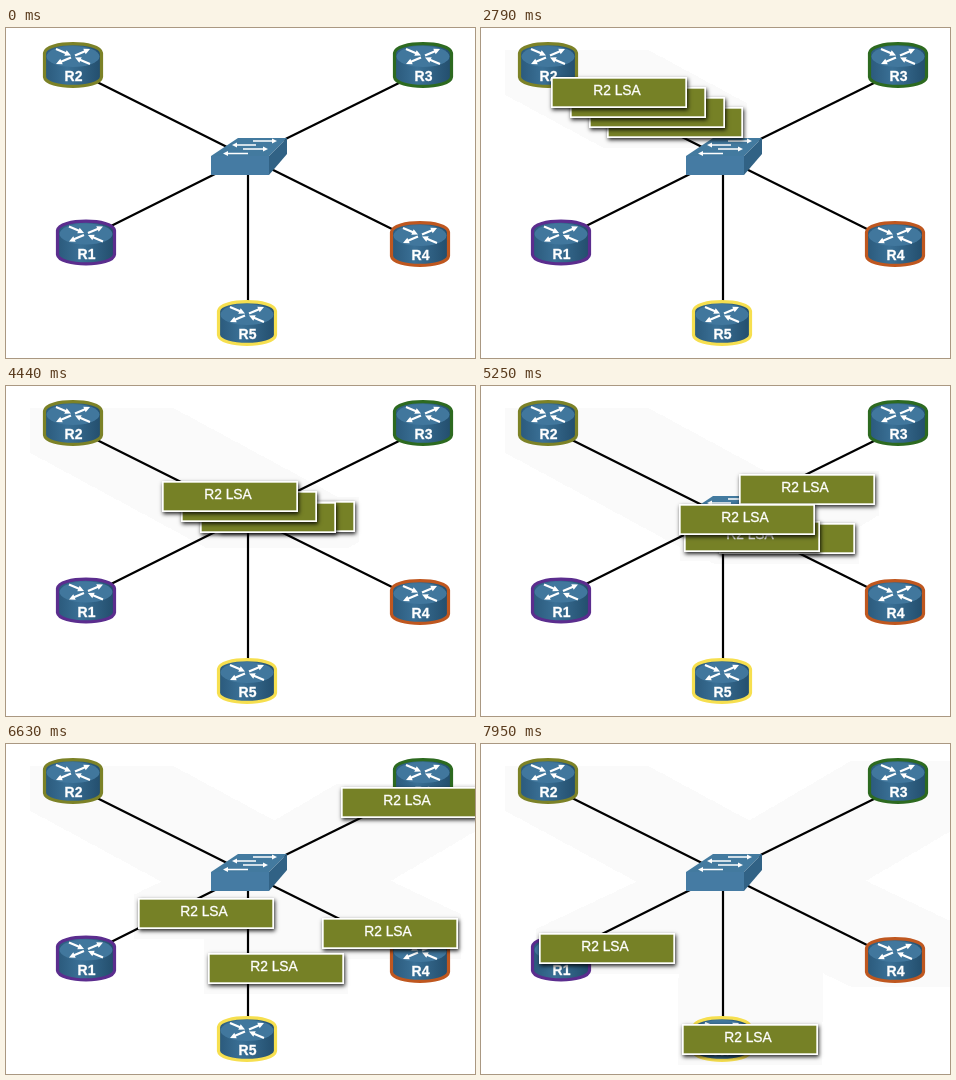
These frames come from a looping animation (469x330 px, 8 s). An HTML page with a canvas:

```html
<!DOCTYPE html>
<html lang="en">
<head>
<meta charset="utf-8">
<title>Link-state flooding</title>
<style>
  html, body { margin: 0; width: 100%; height: 100%; overflow: hidden; background: #fff; }
  canvas { display: block; }
</style>
</head>
<body>
<canvas id="stage" width="469" height="330"></canvas>
<script>
const ctx = document.getElementById('stage').getContext('2d');
const FONT = '"Liberation Sans", Arial, sans-serif';
const LOOP = 8000;

// Cards leave R2 one after another, meet at the switch and fan out.
const FIRST = 900, STAGGER = 360, TO_SWITCH = 3365, TO_ROUTER = 3060, HOLD = 120;
const CARD = { w: 136, h: 31 };
const START = { x: 28, y: 26 };
const TURN = { x: 203.2, y: 120.7 };
const ENDS = [
  { x: 374, y: 20.5 },   // R3
  { x: 375, y: 202.5 },  // R4
  { x: 200.8, y: 285.5 },// R5
  { x: 33, y: 201 }      // R1
];

const HUB = { x: 242, y: 129.6 };
const ROUTERS = [
  { name: 'R2', x: 67, y: 37, color: '#7c8227', link: [90, 53.5] },
  { name: 'R3', x: 417, y: 37, color: '#2d6a20', link: [395, 54] },
  { name: 'R1', x: 80, y: 214.5, color: '#5b2d8e', link: [104, 198.5] },
  { name: 'R4', x: 414, y: 216, color: '#bf571f', link: [388, 202] },
  { name: 'R5', x: 241, y: 295, color: '#f6df4f', link: [242, 275] }
];

const mix = (a, b, k) => ({ x: a.x + (b.x - a.x) * k, y: a.y + (b.y - a.y) * k });

function cardPosition(end, age) {
  if (age < TO_SWITCH) return mix(START, TURN, age / TO_SWITCH);
  return mix(TURN, end, Math.min(1, (age - TO_SWITCH) / TO_ROUTER));
}

function polygon(points, fill) {
  ctx.beginPath();
  points.forEach(([x, y]) => ctx.lineTo(x, y));
  ctx.closePath();
  ctx.fillStyle = fill;
  ctx.fill();
}

function label(text, x, y, font) {
  ctx.font = `${font} ${FONT}`;
  ctx.textAlign = 'center';
  ctx.fillStyle = ctx.strokeStyle = '#fff';
  ctx.lineWidth = 0.3;
  ctx.fillText(text, x, y);
  ctx.strokeText(text, x, y);
}

function arrow(x1, y1, x2, y2, width, head) {
  const length = Math.hypot(x2 - x1, y2 - y1);
  ctx.save();
  ctx.translate(x1, y1);
  ctx.rotate(Math.atan2(y2 - y1, x2 - x1));
  const w = width / 2, neck = length - head;
  polygon([[0, -w], [neck, -w], [neck, -head / 2], [length, 0],
           [neck, head / 2], [neck, w], [0, w]], '#fff');
  ctx.restore();
}

function drawLink({ link }) {
  ctx.beginPath();
  ctx.moveTo(...link);
  ctx.lineTo(HUB.x, HUB.y);
  ctx.strokeStyle = '#000';
  ctx.lineWidth = 2.2;
  ctx.stroke();
}

function drawRouter({ name, x, y, color }) {
  ctx.save();
  ctx.translate(x, y);
  const side = ctx.createLinearGradient(-28, 0, 28, 0);
  side.addColorStop(0, '#2b5a7c');
  side.addColorStop(0.4, '#3a7096');
  side.addColorStop(1, '#234e6d');
  ctx.beginPath();
  ctx.moveTo(-28.5, -12);
  ctx.bezierCurveTo(-27, -24.5, 27, -24.5, 28.5, -12);
  ctx.lineTo(28.5, 12);
  ctx.bezierCurveTo(27, 24.5, -27, 24.5, -28.5, 12);
  ctx.closePath();
  ctx.fillStyle = side;
  ctx.fill();
  ctx.strokeStyle = color;
  ctx.lineWidth = 3.2;
  ctx.stroke();

  ctx.beginPath();
  ctx.ellipse(0, -8.5, 26.5, 10.5, 0, 0, 7);
  ctx.fillStyle = '#41779d';
  ctx.fill();
  arrow(-17, -16, -2, -9.5, 2.2, 6);
  arrow(17, -1, 2, -7.5, 2.2, 6);
  arrow(2, -9.5, 17, -16, 2.2, 6);
  arrow(-2, -7.5, -17, -1, 2.2, 6);
  label(name, 0.5, 16, 'bold 14px');
  ctx.restore();
}

function drawSwitch() {
  polygon([[205, 128], [232, 110], [281, 110], [263, 128]], '#437a9f');
  polygon([[205, 128], [263, 128], [263, 147], [205, 147]], '#457ba3');
  polygon([[263, 128], [281, 110], [281, 126], [263, 147]], '#316285');
  arrow(247, 113, 271, 113, 1.5, 5);
  arrow(250, 117, 226, 117, 1.5, 5);
  arrow(237, 121, 262, 121, 1.5, 5);
  arrow(242, 125.5, 217, 125.5, 1.5, 5);
}

// Faint tint left behind by the soft card shadows.
function drawTrail(end, age) {
  ctx.fillStyle = '#fafafa';
  const last = Math.min(age, TO_SWITCH + TO_ROUTER);
  for (let a = 0; a <= last; a += 20) {
    const { x, y } = cardPosition(end, a);
    ctx.fillRect(Math.round(x) - 4, Math.round(y) - 4, CARD.w + 8, CARD.h + 14);
  }
}

function drawCard(end, age) {
  if (age < 0 || age >= TO_SWITCH + TO_ROUTER + HOLD) return;
  const position = cardPosition(end, age);
  const x = Math.round(position.x), y = Math.round(position.y);
  ctx.save();
  ctx.shadowColor = 'rgba(0, 0, 0, 0.85)';
  ctx.shadowBlur = 4;
  ctx.shadowOffsetX = 0.5;
  ctx.shadowOffsetY = 1.5;
  ctx.fillStyle = '#fff';
  ctx.fillRect(x, y, CARD.w, CARD.h);
  ctx.restore();
  ctx.fillStyle = '#768126';
  ctx.fillRect(x + 1.7, y + 1.7, CARD.w - 3.4, CARD.h - 3.4);
  label('R2 LSA', x + 66, y + 18, '13.8px');
}

function draw(time) {
  const ages = ENDS.map((_, i) => time - FIRST - i * STAGGER);
  ctx.fillStyle = '#fff';
  ctx.fillRect(0, 0, 469, 330);
  ENDS.forEach((end, i) => drawTrail(end, ages[i]));
  ROUTERS.forEach(drawLink);
  ROUTERS.forEach(drawRouter);
  drawSwitch();
  ENDS.forEach((end, i) => drawCard(end, ages[i]));
}

const began = performance.now();
function tick() {
  draw((performance.now() - began) % LOOP);
  requestAnimationFrame(tick);
}
tick();
</script>
</body>
</html>
```
